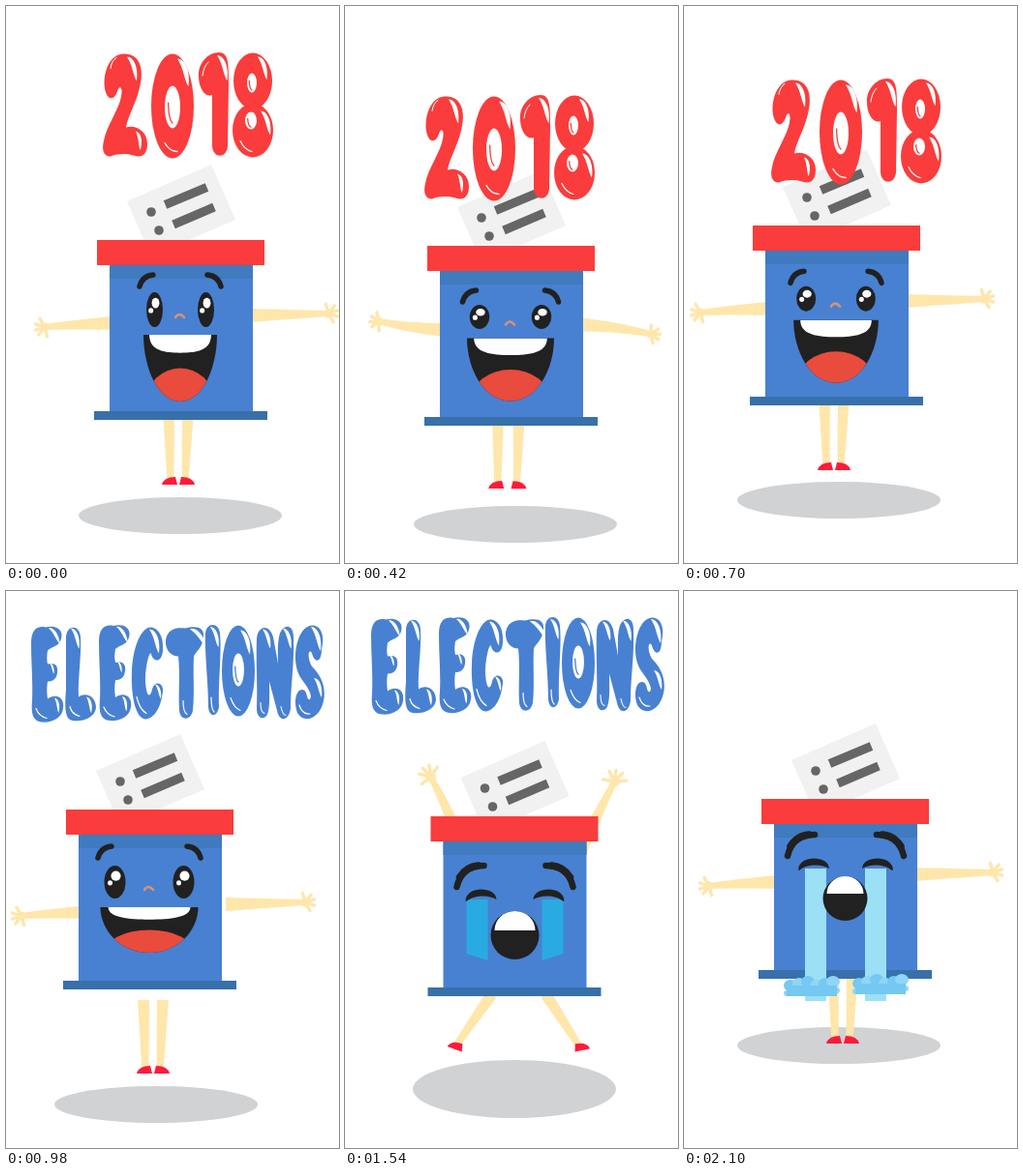
Write an HTML page that moves like this. It is 344x576 px and loops after 2240 ms.

```html
<!DOCTYPE html>
<html lang="en">
<head>
<meta charset="utf-8">
<title>Ballot box</title>
<style>
html, body { margin: 0; width: 100%; height: 100%; overflow: hidden; background: #fff; }
svg { display: block; width: 100%; height: 100%; }
</style>
</head>
<body>
<svg id="stage" viewBox="0 0 344 576" role="img" aria-label="2018 elections"></svg>
<script>
const STEP = 140, COUNT = 16;
const RED = '#fa3c3c', BLUE = '#4881d1', INK = '#212121', SKIN = '#ffe6ab';
const stage = document.getElementById('stage');

const mix = (a, b, u) => a.map((v, i) => v + (b[i] - v) * u);
const at = (x, y, s, extra = '') => `<g transform="translate(${x} ${y}) ${extra}">${s}</g>`;
const path = (d, fill) => `<path d="${d}" fill="${fill}"/>`;
const line = (d, color, w, cap = 'round') =>
  `<path d="${d}" fill="none" stroke="${color}" stroke-width="${w}" stroke-linecap="${cap}"/>`;
const oval = (x, y, rx, ry, fill) => `<ellipse cx="${x}" cy="${y}" rx="${rx}" ry="${ry}" fill="${fill}"/>`;
const rect = (x, y, w, h, fill) => `<rect x="${x}" y="${y}" width="${w}" height="${h}" fill="${fill}"/>`;
const both = s => s + `<g transform="scale(-1 1)">${s}</g>`;

// Bubble lettering
const shine = (x, y, k = 1, turn = 0) =>
  at(x, y, path('M0 0C7 0 12 11 10 25C6 19 6 9 0 0Z', '#fff'), `rotate(${turn}) scale(${k})`);
const hole = (x, y, rx, ry, color) =>
  oval(x, y, rx, ry, '#fff') + line(`M${x - rx * .55} ${y - ry * .2}Q${x - rx * .5} ${y + ry * .6} ${x} ${y + ry * .75}`, color, 1.3);

const glyphs = {
  2: c => path('M4 44C-2 32 3 3 21 2C39 1 43 19 38 37C34 54 26 66 24 78C34 75 46 82 46 95C46 106 40 110 32 107C24 105 16 105 8 108C0 108-1 100 1 92C3 78 17 59 19 46C21 36 17 34 15 41C12 49 7 50 4 44Z', c)
    + shine(25, 5) + shine(34, 82, .75, 8) + line('M8 17Q9 9 14 6', '#fff', 1),
  0: c => oval(22, 56, 22, 54, c) + hole(22, 57, 8, 22, c) + shine(27, 7, 1.15) + line('M14 94Q19 103 27 103', '#fff', 1.4),
  1: c => path('M1 27C0 14 10 2 22 2C32 2 32 14 32 34L31 99C30 112 16 112 15 99L15 46C8 49 1 39 1 27Z', c)
    + shine(20, 5, 1.05) + line('M5 26Q6 17 11 12', '#fff', 1),
  8: c => oval(21, 30, 20, 29, c) + oval(21, 81, 21, 28, c) + hole(20, 32, 5, 10, c) + hole(19, 71, 6, 9, c)
    + shine(26, 5, .95) + shine(29, 61, 1) + line('M8 92Q12 101 20 103', '#fff', 1.2),
  E: c => path('M1 18C1 4 8 0 16 2C26-1 35 4 32 14C30 22 22 22 18 26C17 32 17 36 18 40C26 38 29 42 28 49C27 57 22 58 18 58C17 64 17 70 18 76C26 70 36 74 34 86C33 96 22 101 12 100C2 99 1 90 2 78C3 60 1 40 1 18Z', c)
    + shine(19, 3, .75, -14) + shine(20, 39, .45) + shine(25, 75, .6, 6) + line('M6 86Q9 94 17 96', '#fff', 1.2),
  L: c => path('M1 12C2-1 15-1 16 12C17 34 13 56 14 74C22 68 32 74 32 85C31 96 16 101 6 98C-1 95 0 80 1 66Z', c)
    + shine(6, 3, .85) + shine(22, 74, .65, 5) + line('M5 84Q7 92 15 94', '#fff', 1.2),
  C: c => path('M33 22C34 38 24 40 21 30C20 24 15 40 15 58C16 74 20 76 22 66C25 56 34 60 33 68C31 88 22 97 15 97C4 96 0 70 1 48C2 20 12 1 21 2C29 3 33 12 33 22Z', c)
    + shine(19, 4, 1) + shine(25, 61, .6) + line('M6 74Q9 87 16 91', '#fff', 1.2),
  T: c => path('M0 15C2 3 12 2 20 3C32 0 40 2 39 12C38 24 30 28 29 32C28 50 30 70 28 88C26 99 15 99 14 88C13 70 15 50 13 32C6 32-1 26 0 15Z', c)
    + shine(25, 4, .95, -22) + line('M18 78Q18 90 22 92', '#fff', 1.2),
  I: c => path('M1 10C2-2 15-2 16 10C18 30 14 60 15 86C13 97 5 97 4 86C4 60 0 30 1 10Z', c)
    + shine(6, 3, .85) + line('M7 76Q7 88 10 91', '#fff', 1.2),
  O: c => oval(17, 47, 17, 47, c) + hole(17, 46, 6, 17, c) + shine(19, 5, 1) + line('M9 75Q13 86 19 88', '#fff', 1.2),
  N: c => path('M1 14C2 0 14-2 18 12C20 24 22 32 23 40C23 30 22 18 25 8C30-3 39 0 39 12C40 40 36 62 36 86C34 100 24 100 22 88L14 58C14 72 15 84 12 92C8 99 1 96 1 86C2 60 0 36 1 14Z', c)
    + shine(7, 4, .8) + shine(28, 3, .85) + line('M5 80Q5 90 9 91M26 84Q28 93 31 93', '#fff', 1.1),
  S: c => path('M28 26C28 42 20 40 18 30C14 24 13 36 18 44C28 54 33 66 30 80C26 98 10 104 3 92C-1 82 1 68 8 68C14 68 12 80 16 78C19 74 14 66 8 58C0 48-1 30 4 16C9 1 20-2 26 5C30 11 30 18 28 26Z', c)
    + shine(17, 3, 1) + shine(20, 56, .8) + line('M5 84Q8 94 16 93', '#fff', 1.2)
};
const words = {
  '2018': [RED, [0, 50, 98, 134]],
  'ELECTIONS': [BLUE, [0, 36, 70, 104, 140, 180, 198, 233, 273]]
};
function lettering(text, x, y) {
  const [color, xs] = words[text];
  return at(x, y, [...text].map((ch, i) => at(xs[i], i % 3 === 2 ? 0 : 1.5, glyphs[ch](color))).join(''));
}

// Limbs: tapered quadratic curves
function limb(sx, sy, cx, cy, ex, ey, w0, w1) {
  const near = [], far = [], n = 10;
  for (let i = 0; i <= n; i++) {
    const t = i / n, k = 1 - t;
    const x = k * k * sx + 2 * k * t * cx + t * t * ex, y = k * k * sy + 2 * k * t * cy + t * t * ey;
    const dx = k * (cx - sx) + t * (ex - cx), dy = k * (cy - sy) + t * (ey - cy);
    const r = (w0 + (w1 - w0) * t) / 2 / Math.hypot(dx, dy);
    near.push(`${x - dy * r} ${y + dx * r}`);
    far.unshift(`${x + dy * r} ${y - dx * r}`);
  }
  return path(`M${near.concat(far).join('L')}Z`, SKIN);
}
function hand(x, y, turn, size) {
  const fingers = [-105, -52, -18, 18, 60].map(a => {
    const r = a * Math.PI / 180;
    return `M0 0L${size * Math.cos(r)} ${size * Math.sin(r)}`;
  }).join('');
  return at(x, y, oval(0, 0, size * .45, size * .45, SKIN) + line(fingers, SKIN, 3.4), `rotate(${turn})`);
}
function arm([sx, sy, cx, cy, hx, hy, turn, size]) {
  return limb(sx, sy, cx, cy, hx, hy, 14, 6) + hand(hx, hy, turn, size);
}
function leg([x0, y0, x1, y1, fx, fy, turn], side) {
  return limb(x0, y0, (x0 + x1) / 2, (y0 + y1) / 2, x1, y1, 12, 7)
    + at(fx, fy, path('M-8 4Q-6-4 6-4L8 4Z', '#ff1a3c'), `rotate(${turn}) scale(${side} 1)`);
}

// Each pose: left arm, right arm, left leg, right leg
const wide = [
  [-70, 86, -105, 87, -141, 90, 180, 10], [70, 78, 112, 77, 152, 76, 0, 10],
  [-13, 177, -11, 250, -12, 249, 0], [7, 177, 4, 250, 6, 249, 0]];
const wave = [
  [-70, 91, -117, 75, -120, 31, 260, 7.5], [70, 95, 112, 111, 112, 153, 85, 7.5],
  [-18, 177, -27, 238, -31, 239, 0], [11, 177, 10.5, 239, 13.5, 240, 0]];
const leap = [
  [-62, 20, -80, -25, -99, -61, 245, 12], [54, 20, 72, -20, 91, -56, -65, 12],
  [-24, 177, -42, 204, -61, 230, 20], [32, 177, 66, 230, 69, 231, -12]];
leap[2] = [-24, 177, -60, 229, -61, 230, 20];
const sway = wide.map((part, i) => mix(part, wave[i], .2));

function limbs(pose, ax, ay, lx, ly) {
  const [la, ra, ll, rl] = pose;
  return at(lx, ly, leg(ll, 1) + leg(rl, -1)) + at(ax, ay, arm(la) + arm(ra));
}

function box() {
  return path('M-56-40L31-78L56-21L-31 17Z', '#f1f1f1')
    + line('M-16.5-36.5L26.5-54.5M-8-16L34-34', '#666', 9, 'butt')
    + oval(-31, -29, 4.8, 4.8, '#666') + oval(-23, -10, 4.8, 4.8, '#666')
    + rect(-74, 20, 148, 158, BLUE) + rect(-74, 26, 148, 14, '#407abf')
    + rect(-90, 177, 179, 9, '#3870ab') + rect(-87, 0, 173, 26, RED);
}

// Faces
const nose = y => line(`M-5 ${y + 2}Q-1 ${y - 4} 4 ${y + 2}`, '#d9926f', 2.6);
const clipped = (d, s) => `<clipPath id="mouth"><path d="${d}"/></clipPath>${path(d, INK)}<g clip-path="url(#mouth)">${s}</g>`;

function smile([ex, ey, rx, ry, bx, by, w, top, bottom]) {
  const h = bottom - top, tw = w * .84, tb = top + h * .27;
  const eye = x => oval(x, ey, rx, ry, INK) + oval(x + 1, ey - ry * .38, rx * .46, ry * .3, '#fff')
    + oval(x - rx * .45, ey + ry * .05, 2.5, 2.6, '#fff');
  const mouth = `M${-w} ${top}H${w}C${w} ${top + h * .5} ${w * .6} ${bottom} 0 ${bottom}C${-w * .6} ${bottom} ${-w} ${top + h * .5} ${-w} ${top}Z`;
  const teeth = `M${-tw} ${top}H${tw}C${tw} ${tb - 2} ${tw * .5} ${tb} 0 ${tb}C${-tw * .5} ${tb} ${-tw} ${tb - 2} ${-tw} ${top}Z`;
  return at(-1, 0, both(line(`M${-bx} ${by}Q${-bx + 3} ${by - 11} ${-bx + 14} ${by - 12}`, INK, 5.5))
    + eye(-ex) + eye(ex) + nose(ey + 6)
    + clipped(mouth, path(teeth, '#fff') + oval(0, bottom, w * .92, h * .5, '#e94b3c')));
}
function laugh() {
  const mouth = 'M-57 110C-57 97-45 98-40 102Q0 106 40 102C45 97 57 98 57 112C52 135 30 151 0 151C-30 151-54 135-57 110Z';
  return at(1, 0, both(line('M-61 63Q-55 56-45 56', INK, 5.5)
    + path('M-59 83C-58 61-34 61-33 83C-39 76-52 76-59 83Z', INK)))
    + clipped(mouth, path('M-40 102Q0 106 40 102C41 117 29 125 0 125C-29 125-41 117-40 102Z', '#fff')
    + oval(0, 142, 28, 11, '#dc5a5a'));
}
function puddle(x, y) {
  const lumps = [-22, -13, -4, 5, 14, 22].map((dx, i) => oval(dx, -3 - (i % 3) * 2, 7, 6, i % 2 ? '#8fd6f6' : '#74c8f1'));
  return at(x, y, oval(-26, 5, 3, 3, '#8fd6f6') + oval(26, 2, 3, 3, '#8fd6f6') + lumps.join('') + rect(-26, -3, 52, 11, '#74c8f1'));
}
function cry(u) {
  const tx = 39 - 8 * u, end = 147 + 62 * u, dy = -14 * u, r = 25 - 2 * u;
  const tear = path(`M${-tx - 11} ${86 + dy}H${-tx + 11}V${end - (u ? 0 : -2)}L${-tx - 11} ${end - 5 * (1 - u)}Z`, u ? '#9be0f5' : '#29abe2');
  const eye = at(-35 + 2 * u, 82 + dy, path('M-16 5C-15-10 15-10 16 4C8-1-7-1-15 6Z', INK));
  const brow = at(0, dy, line('M-60 73Q-55 51-32 51', INK, 6.5) + line('M-57 63Q-50 52-38 51', INK, 7.5));
  const mouth = at(0, 123 - 20 * u, oval(0, 0, r, r, INK) + path(`M${-r + 4} -5A${r - 4} ${r - 5} 0 0 1 ${r - 4} -5Z`, '#fff'));
  return both(tear + eye + brow) + at(-.5 * u, 0, mouth)
    + (u === 1 ? puddle(-35, 196) + puddle(36, 194) : '');
}

const moods = [
  [0, [26.5, 72, 8.5, 18, 42, 48, 38, 98, 167]],
  [2, [35.5, 71, 11, 14, 55, 52, 49.5, 95, 151]],
  [4, [28.5, 76, 9.5, 11, 44, 64, 40.5, 96, 170]],
  [7, [35.5, 75, 11, 17, 53, 50, 50.5, 101, 148]],
  [9, [35.5, 75, 11, 15, 55, 56, 52, 101, 150]]
];
function face(i) {
  if (i > 10) return cry((i - 11) / 4);
  if (i > 8) return laugh();
  const k = moods.findIndex(m => m[0] > i), [a, from] = moods[k - 1], [b, to] = moods[k];
  return smile(mix(from, to, (i - a) / (b - a)));
}

// pose, box x y, shadow x y ry, word x y
const beats = [
  [wide, 181, 242, 180, 527, 19, 100, 46],
  [sway, 168, 250, 170, 537, 19, 84, 39],
  [wave, 164.5, 240, 162, 518, 16.5, 67, 88],
  [sway, 172, 248, 176, 536, 19, 82, 90],
  [leap, 186, 224, 196, 507, 19, 97, 45],
  [wide, 158, 227, 160, 511, 19, 90, 73],
  [leap, 170, 237, 172, 520, 19, 28, 74],
  [wide, 149, 226, 155, 531, 19, 25, 34],
  [sway, 167, 243, 168, 528, 19, 20, 42],
  [wave, 171, 245, 180, 531.5, 16.5, 22, 38],
  [sway, 170, 240, 174, 526, 19, 24, 40],
  [leap, 175.5, 233, 175, 515, 30, 26, 26],
  [wide, 171, 215, 172, 495, 19],
  [leap, 176, 189, 176, 485, 19],
  [wide, 181, 217, 180, 497, 19],
  [wide, 167, 215, 160, 470, 19]
];
// Steps where the limbs drift from the box: arm x y, leg x y
const drift = { 7: [8, 20, 6, 20], 9: [0, 8, 2, 10], 11: [12, 20, 0, 7] };

function draw(i) {
  const [pose, x, y, sx, sy, ry, wx, wy] = beats[i];
  stage.innerHTML = oval(sx, sy, 105, ry, '#d1d2d4')
    + at(x, y, limbs(pose, ...(drift[i] || [0, 0, 0, 0])) + box() + face(i))
    + (wx === undefined ? '' : lettering(i < 6 ? '2018' : 'ELECTIONS', wx, wy));
}

let shown = 0;
const start = performance.now();
function tick() {
  const i = Math.floor((performance.now() - start) / STEP) % COUNT;
  if (i !== shown) draw(shown = i);
  requestAnimationFrame(tick);
}
draw(0);
requestAnimationFrame(tick);
</script>
</body>
</html>
```
